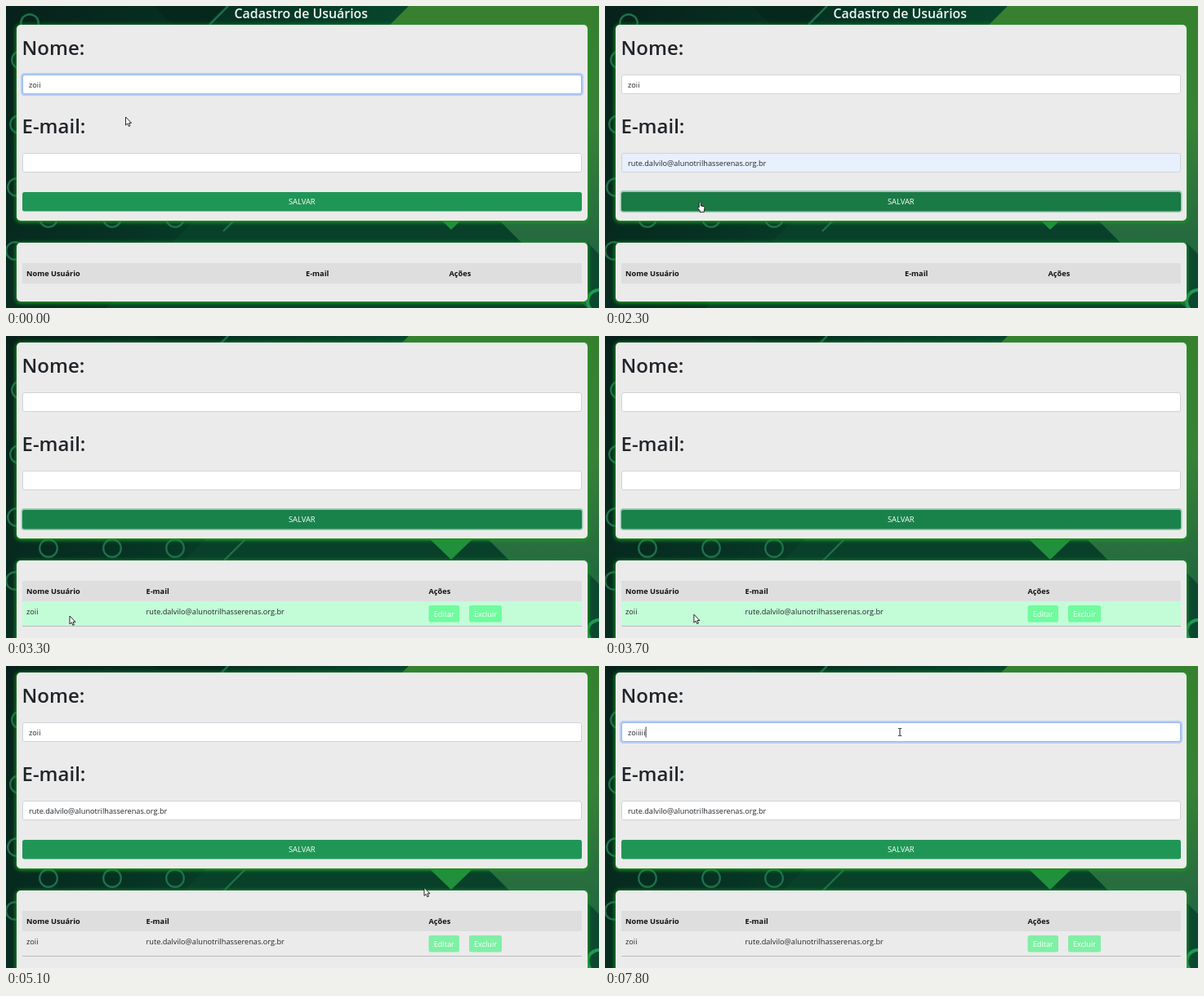
Write an HTML page that moves like this. It is 726 by 370 pixels and loops after 8000 ms.

```html
<!DOCTYPE html>
<html lang="pt-BR">
<head>
<meta charset="utf-8">
<title>Cadastro de Usuários</title>
<style>
html, body { margin: 0; width: 100%; height: 100%; overflow: hidden; background: #08271c; }
svg { display: block; }
text { font-family: "Open Sans", "Noto Sans", sans-serif; font-size: 9.2px; fill: #212529; white-space: pre; }
.h { font-size: 24px; font-weight: 600; }
.title { font-size: 15.9px; font-weight: 600; fill: #f2f5f3; }
.b { font-weight: 700; fill: #111; }
.w { fill: #fff; }
.opt { font-size: 7px; font-weight: 700; fill: #1b1b1b; }
.preview { font-family: "Liberation Sans", Arial, sans-serif; font-size: 8.3px; fill: #222; }
</style>
</head>
<body>
<svg width="726" height="370" viewBox="0 0 726 370">
  <defs>
    <linearGradient id="base" x1="0" x2="1" y1="0" y2="0.25">
      <stop offset="0" stop-color="#07211a"/>
      <stop offset="0.35" stop-color="#063223"/>
      <stop offset="0.7" stop-color="#084a2e"/>
      <stop offset="1" stop-color="#0b4a30"/>
    </linearGradient>
    <linearGradient id="side" x1="0" x2="0" y1="0" y2="1">
      <stop offset="0" stop-color="#37802f"/>
      <stop offset="0.4" stop-color="#3a8038"/>
      <stop offset="0.75" stop-color="#256b3f"/>
      <stop offset="1" stop-color="#1c5f3c"/>
    </linearGradient>
    <filter id="glow" x="-5%" y="-15%" width="110%" height="130%"><feGaussianBlur stdDeviation="2.6"/></filter>
    <filter id="soft" x="-10%" y="-10%" width="120%" height="120%"><feGaussianBlur stdDeviation="2.5"/></filter>
  </defs>

  <g id="backdrop">
    <path d="M0 0H726V370H0Z" fill="url(#base)"/>
    <path d="M180 0H268L245 23H203Z" fill="#06281c"/>
    <path d="M493 0H726V370H711L591 250H243Z" fill="url(#side)"/>
    <path d="M243 250H591L711 370H123Z" fill="#084029"/>
    <path d="M519 249L545 274L571 249Z" fill="#21903c"/>
    <path d="M712 290L726 304V370H712Z" fill="#0c4730"/>
    <g id="rings" fill="none" stroke="#1f7049" stroke-width="2.4">
      <path d="M293 249L266 276M272 0L249 23"/>
    </g>
    <circle cx="726" cy="362" r="14" fill="none" stroke="#1e9a55" stroke-width="4"/>
  </g>

  <g id="page">
    <text class="title" x="279.5" y="15">Cadastro de Usuários</text>
    <g id="cards"></g>
    <text class="h" x="19.5" y="60">Nome:</text>
    <text class="h" x="19.5" y="156">E-mail:</text>
    <g id="fields"></g>
    <rect id="saveRing" x="18.5" y="226" width="688" height="27" rx="4" fill="#a0cbb5"/>
    <rect id="save" x="20" y="228" width="685" height="23.5" rx="2.5"/>
    <text class="w" x="362.3" y="243.3" text-anchor="middle" style="font-size:9.4px">SALVAR</text>
    <rect x="20" y="315" width="685" height="25" fill="#dedede"/>
    <text class="b" x="25" y="331">Nome Usuário</text>
    <text class="b" id="colMail" y="331">E-mail</text>
    <text class="b" id="colAct" y="331">Ações</text>
    <g id="row">
      <rect id="rowBg" x="20" y="340" width="685" height="30.5" fill="#c3fdd8"/>
      <path d="M20 370.5H705" stroke="#b9bcbc"/>
      <text x="25" y="356" id="rowName"></text>
      <text x="171.5" y="356" id="rowMail"></text>
      <g id="acts"></g>
    </g>
  </g>

  <g id="popup">
    <path d="M20 207H266V380H20Z" fill="#000" opacity="0.35" filter="url(#soft)"/>
    <rect x="20" y="205" width="246" height="175" rx="4" fill="#fbfbfb"/>
    <text x="27.5" y="218" style="font-size:6.4px;fill:#666">Informações pessoais salvas</text>
    <path d="M253.5 213L258.5 218M258.5 213L253.5 218" stroke="#333" stroke-width="0.9"/>
    <rect id="pick" x="23.5" y="227.5" width="239" height="22.5" rx="1" fill="#e3effa" stroke="#5d93c4"/>
    <g id="opts"></g>
    <rect x="163" y="232.5" width="70.5" height="12.5" rx="6" fill="#fff"/>
    <text x="198" y="241" text-anchor="middle" style="font-size:5.8px;fill:#666">Usado pela última vez</text>
    <path d="M20 347H266" stroke="#ddd"/>
    <g fill="#222">
      <circle cx="31" cy="358" r="2"/>
      <path d="M27.5 365V363Q28 361 31 361H33V365Z"/>
      <rect x="33" y="360.5" width="4.5" height="4.5" rx="0.6"/>
      <path d="M34 360.5V359.2Q35.2 357.6 36.4 359.2V360.5" fill="none" stroke="#222" stroke-width="0.8"/>
    </g>
    <text x="44" y="363" style="font-size:6.85px">Gerenciar informações pessoais na Gavetona</text>
  </g>

  <g id="pointer">
    <path id="arrow" d="M0.5 0V10L2.8 7.9L4.4 11.4L6 10.7L4.5 7.3H7.5Z" fill="#fff" stroke="#111" stroke-width="0.9"/>
    <path id="beam" d="M-2 -4.5H-0.6L0 -4L0.6 -4.5H2M0 -4V4M-2 4.5H-0.6L0 4L0.6 4.5H2" fill="none" stroke="#222" stroke-width="1"/>
    <path id="hand" d="M-0.8 1Q0.3 -0.4 1.3 1V5L5.2 5.8Q6.2 6.2 6 7.5L5.3 11V12.6H0.2V11L-2.6 7.6Q-2.6 6.2 -0.8 7Z" fill="#fff" stroke="#111" stroke-width="0.9"/>
  </g>
</svg>
<script>
const LOOP = 8000, STEP = 100;
const user = "zoii", mail = "rute.dalvilo@alunotrilhasserenas.org.br";
const $ = id => document.getElementById(id);

function add(parent, tag, attrs, text) {
  const node = document.createElementNS("http://www.w3.org/2000/svg", tag);
  for (const k in attrs) node.setAttribute(k, attrs[k]);
  if (text) node.textContent = text;
  return parent.appendChild(node);
}
const set = (node, key, value) => node.setAttribute(key, value);
const show = (node, on) => set(node, "visibility", on ? "visible" : "hidden");

// Fixed backdrop rings
for (const [cx, cy] of [[52, 260], [130, 260], [207, 260], [29, 21],
  [18, 66], [16, 145], [13, 222], [11, 300]])
  add($("rings"), "circle", { cx, cy, r: 10.8 });

function card(y, h) {
  const box = (dy, attrs) => add($("cards"), "rect", { x: 13, y: y + dy, width: 699, height: h, rx: 5, ...attrs });
  const parts = [
    box(1, { fill: "#1f9a22", stroke: "#1f9a22", "stroke-width": 2, filter: "url(#glow)" }),
    box(1, { fill: "#25891f" }),
    box(0, { fill: "#ebebeb" })
  ];
  return height => parts.forEach(p => set(p, "height", height));
}
card(23, 240);
const sizeTable = card(290, 72);

function field(y) {
  const g = $("fields");
  const ring = add(g, "rect", { x: 18, y: y - 2.5, width: 689, height: 28, rx: 4.5, fill: "#b7cdf5" });
  const box = add(g, "rect", { x: 20.5, y, width: 684, height: 23, rx: 2.5 });
  const label = add(g, "text", { x: 28, y: y + 15.2 });
  const caret = add(g, "path", { stroke: "#222", "stroke-width": 0.9 });
  return ({ text = "", focus = false, blink = false, auto = false, preview = false }) => {
    show(ring, focus);
    set(box, "fill", auto ? "#e8f0fe" : "#fff");
    set(box, "stroke", focus ? "#93b8f3" : "#cfd4d9");
    label.textContent = text;
    set(label, "class", preview ? "preview" : "");
    const x = 28.6 + (preview || !text ? 0 : label.getComputedTextLength());
    set(caret, "d", `M${x} ${y + 5}V${y + 18}`);
    show(caret, blink);
  };
}
const nameField = field(84.5), mailField = field(180.5);

$("rowName").textContent = user;
$("rowMail").textContent = mail;
const actions = [[517.5, 37.5, "Editar"], [567, 40, "Excluir"]].map(([x, width, text]) => {
  const box = add($("acts"), "rect", { x, y: 345, width, height: 20.5, rx: 2.5 });
  add($("acts"), "text", { x: x + width / 2, y: 359, class: "w", "text-anchor": "middle" }, text);
  return box;
});

[mail.slice(0, -5) + "...", mail, "gumercio@gumercio.br", "zelinda@vurna.com", mail.slice(0, -2) + "r"]
  .forEach((text, i) => add($("opts"), "text", { x: 28, y: 241.3 + i * 23.5, class: "opt" }, text));

// Pointer path: time, x, y
const path = [
  [0, 146, 136], [500, 120, 193], [900, 120, 193], [1400, 116, 239.5], [2900, 116, 240],
  [3300, 77.5, 343], [3800, 112, 341], [4000, 112, 341], [4400, 524, 300], [4700, 536, 340],
  [4800, 536, 340], [4900, 533, 318], [5000, 533, 318], [5200, 490, 225], [5300, 490, 225],
  [5600, 388, 140], [5700, 388, 140], [6000, 370.5, 120.5], [6400, 361, 81], [LOOP, 361, 81]
];
function pointerAt(t) {
  const i = path.findIndex(p => p[0] > t);
  const [t0, x0, y0] = path[i - 1], [t1, x1, y1] = path[i];
  const k = (t - t0) / (t1 - t0), e = k * k * (3 - 2 * k);
  return [x0 + (x1 - x0) * e, y0 + (y1 - y0) * e];
}

function update(t) {
  const saved = t >= 2400, editing = t >= 4800;
  const scroll = 15 * Math.min(1, Math.max(0, (t - 2400) / 200));
  const [x, y] = pointerAt(t), py = y + scroll;
  const within = (top, bottom, left = 20, right = 705) =>
    py >= top && py <= bottom && x >= left && x <= right;

  const popup = t >= 900 && t < 1800;
  const preview = popup && y > 227;
  const onSave = !popup && within(228, 251);
  const onRow = saved && within(340, 370);
  const onAct = onRow && within(345, 365, 517, 555);
  const onField = !popup && (within(84, 108) || within(180, 204));

  set($("page"), "transform", `translate(0 ${-scroll})`);
  sizeTable(saved ? 104 : 72);

  const extra = [7300, 7700, 7800].filter(k => t >= k).length;
  const editName = t >= 6500;
  nameField({
    text: !saved || editing ? user + "i".repeat(extra) : "",
    focus: t < 500 || editName,
    blink: editName && !(t >= 7100 && t < 7300)
  });
  const mailFocus = t >= 500 && t < 2300, filled = t >= 1800 && !saved;
  mailField({
    text: preview || filled || editing ? mail : "",
    focus: mailFocus, blink: mailFocus, auto: preview || filled, preview
  });

  const pressed = t >= 2300 && !editing;
  show($("saveRing"), pressed);
  set($("save"), "fill", onSave ? "#197a45" : pressed ? "#19824b" : "#209656");

  set($("colMail"), "x", saved ? 171.5 : 367);
  set($("colAct"), "x", saved ? 517.5 : 542.5);
  $("row").style.display = saved ? "" : "none";
  show($("rowBg"), onRow);
  actions.forEach(box => set(box, "fill", onRow ? "#70fb9f" : "#7ff0a5"));

  $("popup").style.display = popup ? "" : "none";
  show($("pick"), preview);

  const kind = onField ? "beam" : onSave || onAct ? "hand" : "arrow";
  for (const id of ["arrow", "beam", "hand"]) show($(id), id === kind);
  set($("pointer"), "transform", `translate(${x} ${y})`);
}

function tick() {
  const t = performance.now() % LOOP;
  update(Math.floor(t / STEP) * STEP);
  requestAnimationFrame(tick);
}
tick();
</script>
</body>
</html>
```
